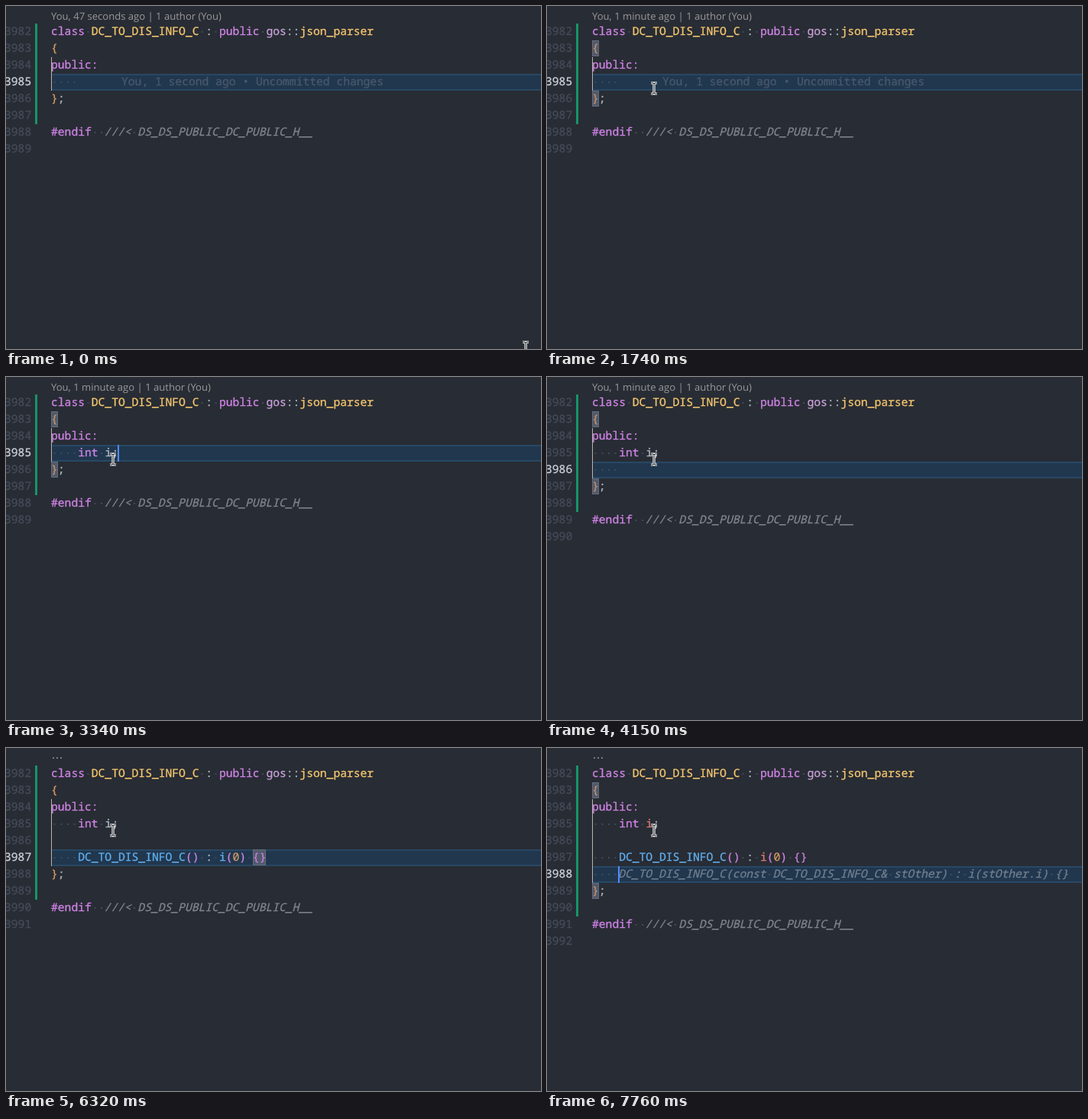
An HTML page that plays this animation: 700 px wide and 450 px high, repeating every 8000 ms.

```html
<!DOCTYPE html>
<html lang="en">
<head>
<meta charset="utf-8">
<style>
html, body { margin: 0; width: 100%; height: 100%; overflow: hidden; background: #282c34; }
#stage { position: relative; width: 700px; height: 450px; overflow: hidden; background: #282c34;
  font: 14.66px/22px "Noto Sans Mono", "DejaVu Sans Mono", monospace; color: #b3bac6;
  text-rendering: geometricPrecision; font-variant-ligatures: none; -webkit-text-stroke: 0.3px; }
#stage div, #stage svg { position: absolute; }
#page { left: 0; top: 0; width: 700px; height: 450px; }
.row, .num { white-space: pre; height: 22px; }
.row { left: 59px; }
.num { left: -2px; color: #454b59; }
.num.on { color: #ccd0d8; }
.lens { left: 59px; top: 2px; font: 13.07px/22px "Open Sans", "Noto Sans", sans-serif; color: #999;
  white-space: pre; -webkit-text-stroke: 0; }
.now { left: 59px; right: 0; height: 22px; box-sizing: border-box; background: #21374e; border: solid #274866; border-width: 2px 0; }
.bar { left: 38px; top: 23px; width: 3px; background: #189468; }
.guide { left: 59px; top: 67px; width: 1px; background: #b9b3aa; }
.caret { width: 2px; height: 22px; background: #528bff; }
.blame { left: 151px; color: #48596d; white-space: pre; }
s { text-decoration: none; background: radial-gradient(circle at 50% 55%, #414a59 0.9px, transparent 1.3px); }
.k { color: #d084e6; } .y { color: #f5c76f; } .g { color: #c5a0d6; } .b { color: #61afef; }
.o { color: #d19a66; } .r { color: #dd7a72; }
.c, .q { position: relative; left: -1px; font-style: italic; }
.c { color: #7f848e; }
.q { color: #6f7f8f; }
.H, .P { background: #515a6b; box-shadow: inset 0 0 0 1px #646c79; padding-bottom: 1px; }
.H { color: #c0916a; } .P { color: #cf80e5; }
.W { color: #cf80e5; background: #43536c; }
#menu { left: 121px; top: 111px; width: 432px; height: 268px; box-sizing: border-box; background: #21252b; border: 1px solid #181a1f; }
#menu div { left: 0; width: 430px; height: 22px; white-space: pre; }
#menu div:first-child { background: #2c313a; }
#menu span { position: absolute; left: 22px; top: 0; }
#menu b { color: #f2f4f8; -webkit-text-stroke: 0; }
#menu em { position: absolute; right: 9.5px; font-style: normal; font-size: 12.5px; }
#menu u { position: absolute; right: 0; top: 0; width: 9px; height: 21px; background: #3b414c; }
#menu svg { left: 2px; top: 3px; fill: none; }
</style>
</head>
<body>
<div id="stage">
  <div id="page"></div>
  <div id="menu"></div>
  <svg id="mouse" width="12" height="18" viewBox="-6 -9 12 18" fill="none">
    <path d="M-4 -7H-1L0 -6L1 -7H4M0 -6V6M-4 7H-1L0 6L1 7H4" stroke="#fff" stroke-width="3.2"/>
    <path d="M-4 -7H-1L0 -6L1 -7H4M0 -6V6M-4 7H-1L0 6L1 7H4" stroke="#16181c" stroke-width="1"/>
  </svg>
</div>
<script>
const LOOP = 8000, TOP = 23, LINE = 22, LEFT = 59, CHAR = 8.797;
const $ = id => document.getElementById(id);

// Lines are tokens split by "|"; the first letter of a token is its style.
const NAME = 'DC_TO_DIS_INFO_C';
const HEAD = `kclass |y${NAME}|w : |kpublic |ggos|w::|yjson_parser`;
const TAIL = 'k#endif|w  |c///< DS_DS_PUBLIC_DC_PUBLIC_H__';
const IND = 'w    ';
const ctor = (member, braces) =>
  `${IND}|b${NAME}|k()|w : |${member}i|k(|o0|k)|w |${braces}{}`;
const member = style => `${IND}|kint|w |${style}i|w;`;
const done = [member('w'), ''];
const GHOST = `${IND}|q${NAME}() : i(0) {}`;
const GHOST_COPY = `${IND}|q${NAME}(const ${NAME}& stOther) : i(stOther.i) {}`;

// Each step changes part of the editor state; the rest carries over.
const steps = [
  [0, { ago: '47 seconds', body: [IND], col: null, blame: true, brace: 'o', menu: false }],
  [970, { brace: 'H' }],
  [1100, { col: 4 }],
  [1620, { col: null }],
  [1740, { ago: '1 minute' }],
  [2140, { body: [IND + '|wi'], col: 5, blame: false }],
  [2210, { body: [IND + '|win'], col: 6 }],
  [2340, { body: [IND + '|wint'], col: 7 }],
  [2410, { menu: true }],
  [2600, { body: [IND + '|Wint'] }],
  [2820, { body: [IND + '|kint|w '], col: 8, menu: false }],
  [3070, { body: [IND + '|kint|w i'], col: 9 }],
  [3280, { body: [member('w')], col: 10 }],
  [3590, { body: [member('w'), IND], col: 4 }],
  [4150, { col: null }],
  [4340, { ago: '' }],
  [4680, { body: [...done, IND], col: 4 }],
  [5280, { col: null }],
  [5350, { body: [...done, GHOST], col: 4 }],
  [5480, { body: [...done, ctor('b', 'k')], col: 32 }],
  [5610, { body: [...done, ctor('b', 'P')], brace: 'o' }],
  [6260, { col: null }],
  [6400, { body: [...done, ctor('b', 'k'), IND], col: 4 }],
  [6470, { brace: 'H' }],
  [6910, { body: [member('r'), '', ctor('r', 'k'), IND] }],
  [7060, { col: null }],
  [7640, { body: [member('r'), '', ctor('r', 'k'), GHOST_COPY], col: 4 }]
];
const states = [];
for (const [, change] of steps) states.push({ ...states.at(-1), ...change });

const escape = s => s.replace(/&/g, '&amp;').replace(/</g, '&lt;');
const paint = line => line && line.split('|').map(tok =>
  `<span class="${tok[0]}">${escape(tok.slice(1)).replace(/ /g, '<s> </s>')}</span>`).join('');
const box = (cls, style, html = '') => `<div class="${cls}" style="${style}">${html}</div>`;
const rowY = i => TOP + i * LINE;

function editor(s) {
  const lines = [HEAD, s.brace + '{', 'kpublic:', ...s.body, s.brace + '}|w;', '', TAIL, ''];
  const active = 2 + s.body.length;
  const y = rowY(active);
  let html = s.ago
    ? box('lens', '', `You, ${s.ago} ago | 1 author (You)`)
    : '<svg width="20" height="6" style="left:59px;top:10px" fill="#999"><circle cx="3" cy="3" r="1"/><circle cx="8" cy="3" r="1"/><circle cx="13" cy="3" r="1"/></svg>';
  html += box('now', `top:${y}px`) + box('bar', `height:${(active + 3) * LINE}px`);
  lines.forEach((line, i) => {
    const top = `top:${rowY(i) - 1}px`;
    html += box(i === active ? 'num on' : 'num', top, 3982 + i) + box('row', top, paint(line));
  });
  html += box('guide', `height:${y + LINE - 67}px`);
  if (s.blame) html += box('blame', `top:${y - 1}px`, 'You, 1 second ago • Uncommitted changes');
  if (s.col !== null) html += box('caret', `top:${y}px;left:${Math.round(LEFT + s.col * CHAR) - 1}px`);
  return html;
}

const icons = {
  macro: '<path stroke="#d0d3d8" d="M1.5 3.5h13v9h-13zM4 6.5h8M4 9.5h8"/>',
  word: '<path stroke="#d0d3d8" d="M1 3.5h6M10 3.5h5M1 6.5h2M5 6.5h7M1 9.5h8M11 9.5h4M1 12.5h5M8 12.5h6"/>',
  cube: '<path stroke="#b180d7" d="M8 1.5L13.5 4.5V11L8 14.5L2.5 11V4.5ZM2.5 4.5L8 7.7L13.5 4.5M8 7.7V14.5"/>',
  link: '<circle cx="3.2" cy="8" r="2.3" fill="#75beff"/><path stroke="#75beff" d="M5 8h4"/><circle cx="11.7" cy="8" r="2.7" stroke="#75beff" stroke-width="1.2"/>',
  type: '<path stroke="#75beff" d="M6.5 6.5v-4h8v7h-4M9 4.5h3.5M9 6.5h3.5M1.5 6.5h8v7h-8zM3.5 9.5h4M3.5 11.5h4"/>',
  value: '<path stroke="#75beff" d="M1.5 6L9 2.5L14.5 5V10L7 13.5L1.5 10.5ZM1.5 6L7 8.5L14.5 5M7 8.5V13.5"/>'
};
const items = ['macro', 'word', 'cube 10_to_str', 'link 128_opt', 'type 128_type', 'value 128_value',
  'link 15', 'link 16', 'link 16_t', 'link 16x4_t', 'link 16x4x2_t', 'link 16x4x3_t'];
$('menu').innerHTML = items.map((item, i) => {
  const [icon, rest = ''] = item.split(' ');
  const detail = i ? '' : '<em>#define int EMIT WARNING C4005</em><u></u>';
  return box('', `top:${i * LINE}px`,
    `<svg width="16" height="16">${icons[icon]}</svg><span><b>int</b>${rest}</span>${detail}`);
}).join('');

// The pointer travels in 13 sampled hops, then settles.
function pointer(t) {
  if (t >= 910 && t < 1040) return [145, 107];
  const p = t < 70 ? 0 : Math.min(1, (Math.floor((t - 70) / 62.5) + 1) / 13);
  const e = p * p * (3 - 2 * p);
  return [680 - 540 * e, 448 - 340 * e];
}

let shown = -1;
function frame() {
  const t = performance.now() % LOOP;
  const at = steps.findLastIndex(([start]) => start <= t);
  if (at !== shown) {
    shown = at;
    $('page').innerHTML = editor(states[at]);
    $('menu').style.display = states[at].menu ? 'block' : 'none';
  }
  const [x, y] = pointer(t);
  $('mouse').style.transform = `translate(${Math.round(x) - 6}px, ${Math.round(y) - 9}px)`;
  requestAnimationFrame(frame);
}
frame();
</script>
</body>
</html>
```
